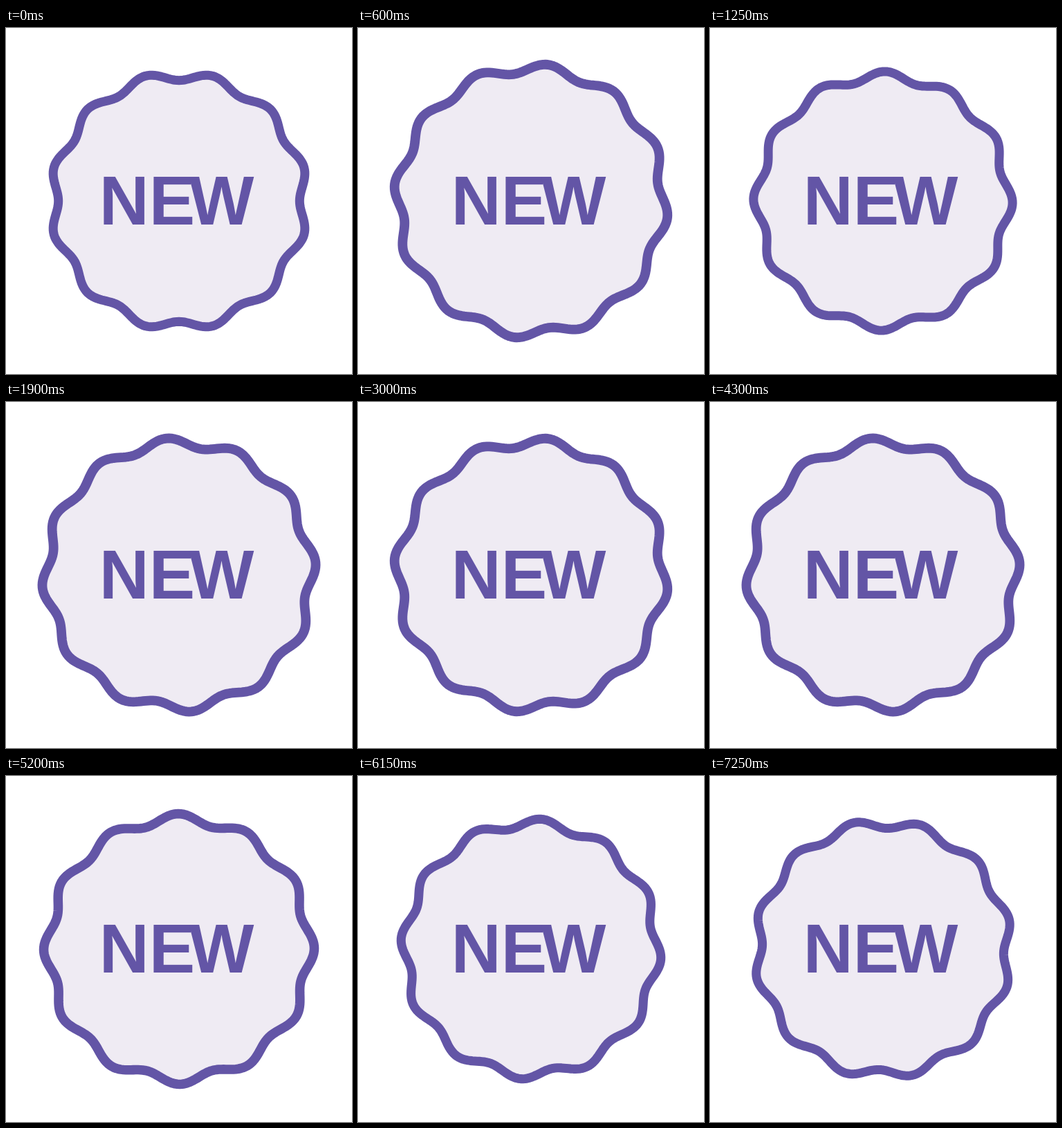
Write an HTML page that moves like this. It is 500 by 500 pixels and loops after 7300 ms.

```html
<!DOCTYPE html>
<html lang="en">
<head>
<meta charset="utf-8">
<title>New badge</title>
<style>
  html, body { margin: 0; width: 100%; height: 100%; overflow: hidden; background: #fff; }
  svg { display: block; width: 100vw; height: 100vh; }
  #seal { fill: #efebf3; stroke: #6355a6; stroke-width: 13; stroke-linejoin: round; }
  text { font: 700 99.5px "Liberation Sans", Arial, sans-serif; font-kerning: none; fill: #6355a6; }
</style>
</head>
<body>
<svg viewBox="0 0 500 500">
  <path id="seal"/>
  <text x="134.8" y="284.4" dx="0 0 -8.5">NEW</text>
</svg>
<script>
  const LOOP = 7300, STEP = 50, STEPS = 48;
  const BUMPS = 12, RADIUS = 180.7, WAVE = 6.4;
  const TURN = 90, GROWTH = 0.061;
  const seal = document.getElementById('seal');

  function scallop() {
    const points = [];
    for (let deg = 0; deg < 360; deg++) {
      const a = deg * Math.PI / 180;
      const r = RADIUS - WAVE * Math.cos(BUMPS * a);
      points.push((r * Math.cos(a)).toFixed(2) + ' ' + (r * Math.sin(a)).toFixed(2));
    }
    return 'M' + points.join('L') + 'Z';
  }

  function draw(now) {
    // The cycle restarts one step before it would be complete.
    const part = Math.floor(now % LOOP / STEP) % STEPS / (STEPS + 1);
    // Two swells per cycle while the seal turns past three bumps.
    const swell = (1 - Math.cos(4 * Math.PI * part)) / 2;
    seal.setAttribute('transform',
      `translate(250 250) rotate(${part * TURN}) scale(${1 + GROWTH * swell})`);
  }

  function tick() {
    draw(performance.now());
    requestAnimationFrame(tick);
  }

  seal.setAttribute('d', scallop());
  tick();
</script>
</body>
</html>
```
